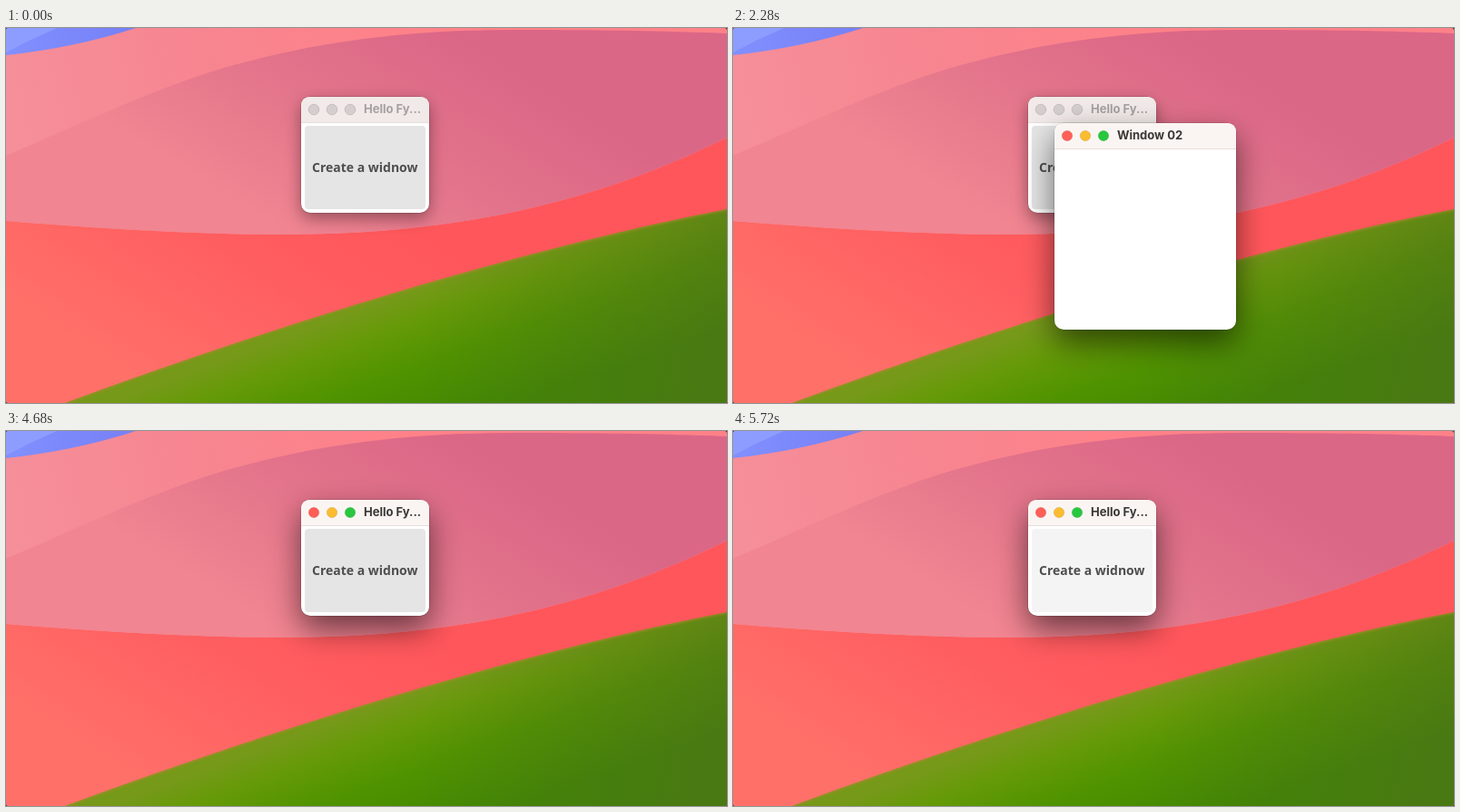
An HTML page that plays this animation: 794x414 px, repeating every 6360 ms.

```html
<!DOCTYPE html>
<html lang="en">
<head>
<meta charset="utf-8">
<title>Create a window</title>
<style>
  html, body { margin: 0; width: 100%; height: 100%; overflow: hidden; background: #3a2a28; }
  svg { display: block; width: 794px; height: 414px; border-radius: 3px; }
  .title { font: 700 13px Inter, "Liberation Sans", sans-serif; }
  .label { font: 700 14px "Noto Sans", "Open Sans", sans-serif; fill: #4e4e4e; }
</style>
</head>
<body>
<svg id="stage" viewBox="0 0 794 414" xmlns="http://www.w3.org/2000/svg">
  <defs>
    <linearGradient id="sky" gradientUnits="userSpaceOnUse" x1="0" y1="100" x2="460" y2="0">
      <stop offset="0" stop-color="#f58f9a"/><stop offset=".5" stop-color="#f78590"/><stop offset="1" stop-color="#ff8188"/>
    </linearGradient>
    <linearGradient id="blue" gradientUnits="userSpaceOnUse" x1="0" y1="30" x2="140" y2="0">
      <stop offset="0" stop-color="#8190ff"/><stop offset="1" stop-color="#7680f5"/>
    </linearGradient>
    <linearGradient id="pink" gradientUnits="userSpaceOnUse" x1="480" y1="0" x2="330" y2="240">
      <stop offset="0" stop-color="#db6787"/><stop offset=".5" stop-color="#e3748b"/><stop offset="1" stop-color="#f18591"/>
    </linearGradient>
    <linearGradient id="red" gradientUnits="userSpaceOnUse" x1="420" y1="200" x2="250" y2="460">
      <stop offset="0" stop-color="#ff565b"/><stop offset=".4" stop-color="#ff5d60"/><stop offset="1" stop-color="#ff7069"/>
    </linearGradient>
    <linearGradient id="green" gradientUnits="userSpaceOnUse" x1="500" y1="270" x2="555" y2="420">
      <stop offset="0" stop-color="#76991a"/><stop offset=".2" stop-color="#669a08"/>
      <stop offset=".5" stop-color="#509300"/><stop offset="1" stop-color="#3f8702"/>
    </linearGradient>
    <linearGradient id="dusk" gradientUnits="userSpaceOnUse" x1="480" y1="230" x2="794" y2="300">
      <stop offset="0" stop-color="#5a6030" stop-opacity="0"/><stop offset="1" stop-color="#5a6030" stop-opacity=".36"/>
    </linearGradient>
    <filter id="soft"><feGaussianBlur stdDeviation="1"/></filter>
    <filter id="far" x="-60%" y="-60%" width="220%" height="220%"><feGaussianBlur stdDeviation="17"/></filter>
    <filter id="near" x="-40%" y="-40%" width="180%" height="180%"><feGaussianBlur stdDeviation="9"/></filter>
    <clipPath id="hill"><path d="M65 414C310 324 560 246 794 200V414Z"/></clipPath>
  </defs>

  <rect width="794" height="414" fill="url(#sky)"/>
  <path d="M0 0H143Q75 22 0 30Z" fill="url(#blue)"/>
  <path d="M0 0H56Q28 12 0 27Z" fill="#8d9dff"/>
  <path d="M0 213C100 221 200 228 310 228C540 228 690 172 794 121V414H0Z" fill="url(#red)"/>
  <path d="M0 141C90 103 180 58 270 36C370 10 470 2 560 2S720 3 794 6V121C690 172 540 228 310 228C200 228 100 221 0 213Z" fill="url(#pink)"/>
  <g clip-path="url(#hill)">
    <rect y="190" width="794" height="224" fill="url(#green)"/>
    <rect y="190" width="794" height="224" fill="url(#dusk)"/>
    <path d="M65 414C310 324 560 246 794 200" fill="none" stroke="#a88a2c" stroke-opacity=".7" stroke-width="3" filter="url(#soft)"/>
  </g>
</svg>
<script>
const NS = "http://www.w3.org/2000/svg";
const stage = document.getElementById("stage");
const LOOP = 6360, STEP = 40, OPEN_MS = 200;
const LIGHTS = ["#ff5f57", "#fabc30", "#28c73f"];

function add(parent, tag, attrs = {}, text) {
  const el = document.createElementNS(NS, tag);
  for (const k in attrs) el.setAttribute(k, attrs[k]);
  if (text) el.textContent = text;
  return parent.appendChild(el);
}

function set(el, attrs) {
  for (const k in attrs) el.setAttribute(k, attrs[k]);
}

function makeWindow(w, h, title) {
  const root = add(stage, "g");
  const box = { width: w, height: h, rx: 10 };
  const far = add(root, "rect", { ...box, y: 14, "fill-opacity": .56, filter: "url(#far)" });
  const near = add(root, "rect", { ...box, y: 6, "fill-opacity": .38, filter: "url(#near)" });
  add(root, "rect", { x: -.5, y: -.5, width: w + 1, height: h + 1, rx: 10.5, "fill-opacity": .22 });
  add(root, "rect", { ...box, fill: "#fff" });
  const bar = add(root, "path", { d: `M0 28V10Q0 0 10 0H${w - 10}Q${w} 0 ${w} 10V28Z` });
  add(root, "rect", { y: 28, width: w, height: 1, fill: "#e6dfdc" });
  const dots = LIGHTS.map((c, i) =>
    add(root, "circle", { cx: 14 + 20 * i, cy: 14, r: 5.8, "stroke-width": .7 }));
  const marks = add(root, "g", { stroke: "#000", "stroke-opacity": .6, "stroke-width": 1.4, fill: "none" });
  add(marks, "path", { d: "M11.2 11.2l5.6 5.6m0-5.6l-5.6 5.6M30 14h8" });
  add(marks, "path", { d: "M51.3 12.7v4h4zM52.7 11.3h4v4z", fill: "#000", "fill-opacity": .65, stroke: "none" });
  const name = add(root, "text", { x: 69, y: 18, class: "title" }, title);

  return {
    root,
    focus(on) {
      far.style.display = on ? "" : "none";
      near.style.display = on ? "none" : "";
      bar.setAttribute("fill", on ? "#faf5f2" : "#f1eae9");
      name.setAttribute("fill", on ? "#3a3735" : "#a5a09f");
      dots.forEach((d, i) => set(d, on
        ? { fill: LIGHTS[i], stroke: "rgba(0,0,0,.12)" }
        : { fill: "#d4cfce", stroke: "#b9b3b2" }));
    },
    hover(on, pressed) {
      marks.style.display = on ? "" : "none";
      if (pressed) dots[0].setAttribute("fill", "#bb4740");
    }
  };
}

const main = makeWindow(141, 128, "Hello Fy...");
main.root.setAttribute("transform", "translate(325 76)");
const button = add(main.root, "rect", { x: 4, y: 32, width: 133, height: 92, rx: 4 });
add(main.root, "text", { x: 12, y: 83, class: "label" }, "Create a widnow");
const child = makeWindow(200, 228, "Window 02");

// Each visit of the second window: place and key times
const VISITS = [
  { x: 354, y: 105, blur: 0, open: 0, hover: 3440, press: 3600, close: 3640 },
  { x: 383, y: 134, blur: 4760, open: 4760, hover: 5320, press: 5600, close: 5680 }
];
// Button fill from each time on
const FILLS = [[0, "#e5e5e5"], [3680, "#f4f4f4"], [4200, "#e5e5e5"], [5720, "#f4f4f4"]];

function draw(t) {
  const v = VISITS.find(s => t >= s.blur && t < s.close);
  main.focus(!v);
  main.hover(false);
  button.setAttribute("fill", FILLS.filter(f => t >= f[0]).pop()[1]);

  const p = v ? Math.min(1, (t - v.open) / OPEN_MS) : 0;
  child.root.style.display = p > 0 ? "" : "none";
  if (p <= 0) return;
  const ease = 1 - (1 - p) ** 2;
  const k = .8 + .2 * ease;
  set(child.root, {
    opacity: ease,
    transform: `translate(${v.x + 100 * (1 - k)} ${v.y + 114 * (1 - k)}) scale(${k})`
  });
  child.focus(true);
  child.hover(t >= v.hover, t >= v.press);
}

const start = performance.now();
let last = -1;
function tick() {
  const t = Math.floor(((performance.now() - start) % LOOP) / STEP) * STEP;
  if (t !== last) draw(last = t);
  requestAnimationFrame(tick);
}
tick();
</script>
</body>
</html>
```
